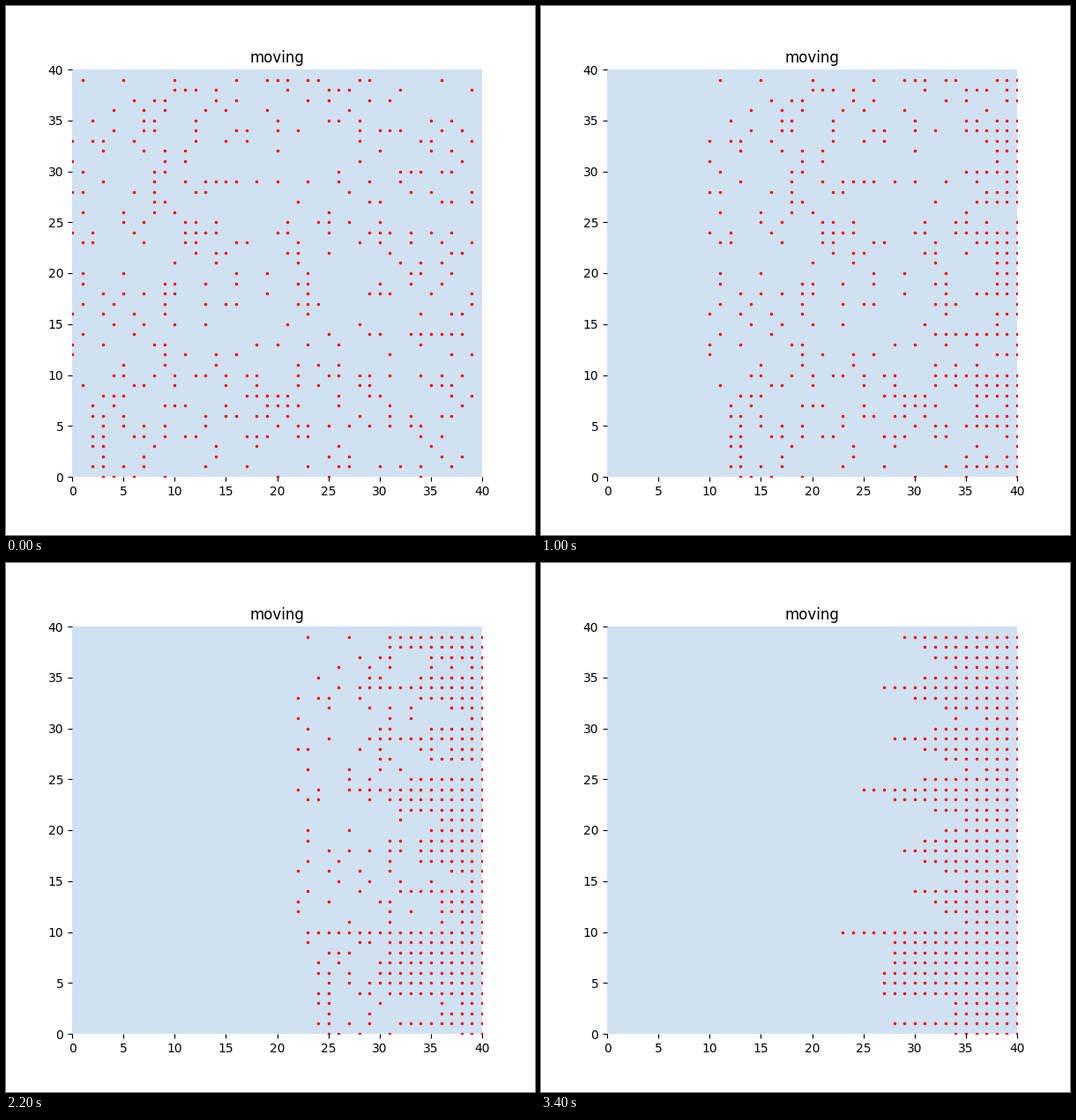
Write a matplotlib script that moves like this. It is 600 px wide and 600 px high and loops after 4.1 s.

```python
import random

import matplotlib.pyplot as plt
import numpy as np
from matplotlib.animation import FuncAnimation

SIZE = 40
STEPS = 41
INTERVAL = 100

# Outline of the settled pile: key rows and the number of dots in them.
KEY_ROWS = [0, 1, 2, 3, 4, 9, 10, 11, 14, 15, 18, 21, 24, 26, 29, 31, 34, 36, 39]
KEY_COUNTS = [7, 13, 7, 7, 14, 13, 18, 6, 11, 6, 12, 6, 16, 5, 13, 5, 14, 7, 12]


def scatter_rows():
    rng = random.Random(7)
    counts = np.interp(range(SIZE), KEY_ROWS, KEY_COUNTS).round().astype(int)
    return [sorted(rng.sample(range(SIZE), int(n))) for n in counts]


def positions(step):
    """Each dot moves right one cell per step until the next one blocks it."""
    points = []
    for y, cols in enumerate(rows):
        limit = SIZE
        for col in reversed(cols):
            x = min(col + step, limit)
            points.append((x, y))
            limit = x - 1
    return points


rows = scatter_rows()

fig, ax = plt.subplots(figsize=(6, 6), dpi=100)
ax.set_facecolor(plt.cm.Blues(0.2))
ax.spines[:].set_visible(False)
ax.set(xlim=(0, SIZE), ylim=(0, SIZE), title="moving")
ax.set_xticks(range(0, SIZE + 1, 5))
ax.set_yticks(range(0, SIZE + 1, 5))
dots = ax.scatter(*zip(*positions(0)), s=2.2, color="red")


def update(step):
    dots.set_offsets(positions(step))
    return (dots,)


anim = FuncAnimation(fig, update, frames=STEPS, interval=INTERVAL,
                     repeat=True, repeat_delay=0)
plt.show()
```
